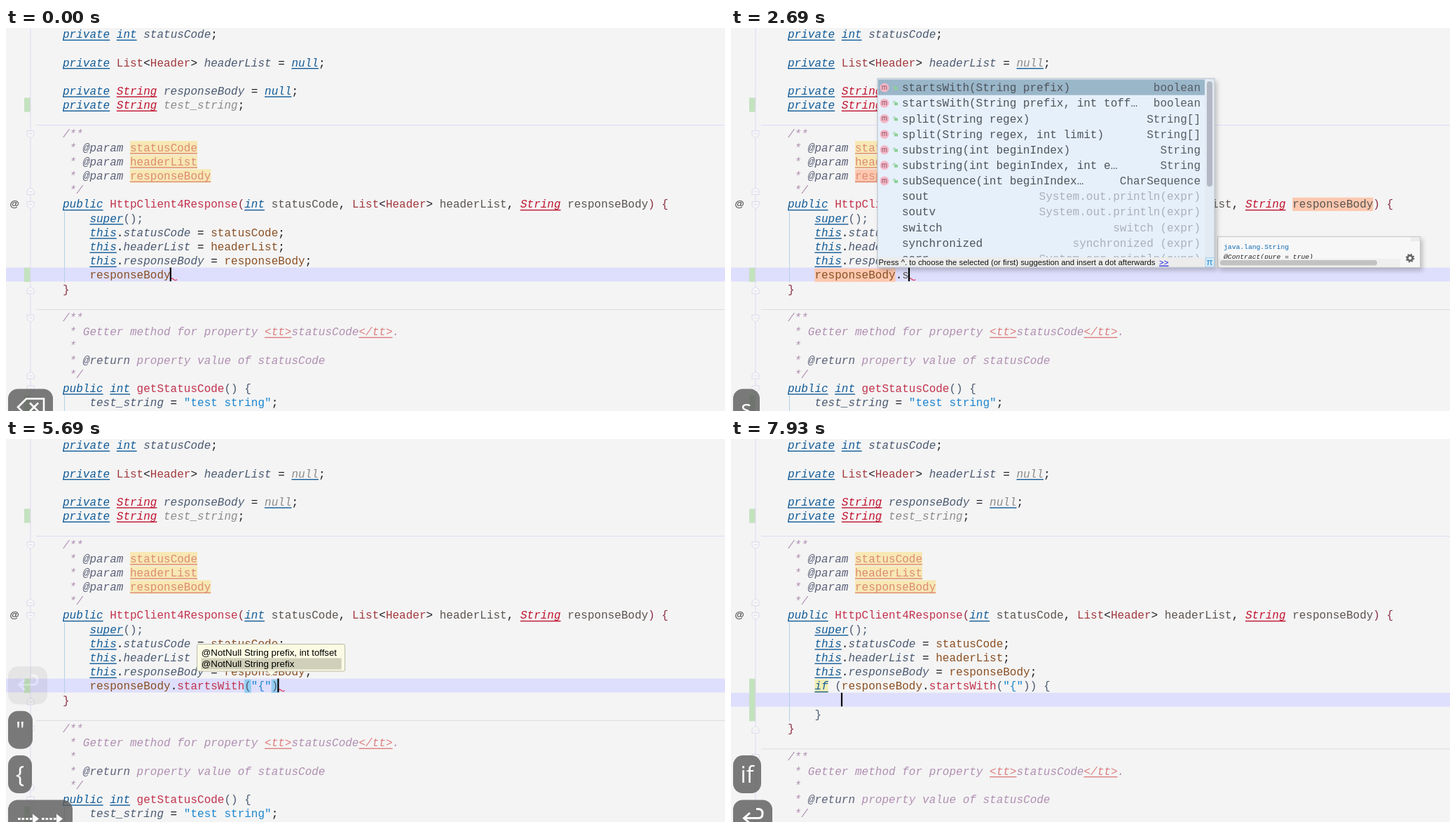
These frames come from a looping animation (1026 by 546 pixels, 8000 ms). An HTML page:

```html
<!DOCTYPE html>
<html lang="en">
<head>
<meta charset="utf-8">
<title>Postfix completion</title>
<style>
html, body { margin: 0; width: 100%; height: 100%; overflow: hidden; background: #f4f4f4; }
svg { display: block; width: 100vw; height: 100vh; }
text { white-space: pre; }
.code { font: 16px "Liberation Mono", monospace; }
.slant { font-style: italic; }
.ui { font-family: "Liberation Sans", sans-serif; }
.key { font: 32px "Open Sans", sans-serif; fill: #fff; }
</style>
</head>
<body>
<svg id="stage" viewBox="0 0 1026 546"></svg>
<script>
const stage = document.getElementById('stage');
const LOOP = 8000, CHAR = 9.602, LEFT = 81, PITCH = 20.19;
const rowTop = r => -1.1 + PITCH * r;
const colX = c => LEFT + CHAR * c;
const esc = s => s.replace(/&/g, '&amp;').replace(/</g, '&lt;');
const rect = (x, y, w, h, fill, more = '') =>
  `<rect x="${x}" y="${y}" width="${w}" height="${h}" fill="${fill}" ${more}/>`;
const path = (d, stroke, width = 1, fill = 'none', more = '') =>
  `<path d="${d}" fill="${fill}" stroke="${stroke}" stroke-width="${width}" ${more}/>`;
const text = (x, y, s, fill, more = 'class="code"') =>
  `<text x="${x}" y="${y}" fill="${fill}" ${more}>${esc(s)}</text>`;

// c: colour, i: italic, u: underline colour, bg: background,
// hot: marked as an occurrence, pair: marked as a matching bracket
const BLUE = '#125c98', RED = '#c0142f', YELLOW = '#f7e8b4', ORANGE = '#fdc8af';
const styles = {
  k: { c: BLUE, i: 1, u: BLUE },
  n: { c: BLUE, i: 1, u: BLUE },
  S: { c: RED, i: 1, u: RED },
  l: { c: '#a23a3e' },
  f: { c: '#4b5a72', i: 1 },
  u: { c: '#8c8c8c', i: 1 },
  c: { c: '#b08fb2', i: 1 },
  a: { c: '#5c6078', i: 1 },
  j: { c: '#dd8b74', u: '#dd8b74', bg: YELLOW },
  J: { c: '#dd8b74', u: '#dd8b74', bg: YELLOW, hot: 1 },
  t: { c: '#dd7f80', i: 1, u: '#dd7f80' },
  m: { c: '#c2334d' },
  b: { c: '#8a5024' },
  B: { c: '#8a5024', hot: 1 },
  p: { c: '#5a5450' },
  P: { c: '#5a5450', hot: 1 },
  x: { c: '#4b5a72' },
  X: { c: '#4b5a72', pair: 1 },
  r: { c: '#8c2f45' },
  s: { c: '#1c86d0' },
  I: { c: BLUE, i: 1, u: BLUE, bg: '#f0eeb4' }
};

const head = [
  '«k private» «k int» «f statusCode»;', '',
  '«k private» «l List»<«l Header»> «f headerList» = «n null»;', '',
  '«k private» «S String» «f responseBody» = «n null»;',
  '«k private» «S String» «u test_string»;', '',
  '«c /**»',
  '«c  * »«a @param» «j statusCode»',
  '«c  * »«a @param» «j headerList»',
  '«c  * »«a @param» «J responseBody»',
  '«c  */»',
  '«k public» «m HttpClient4Response»«r (»«k int» «p statusCode», «l List»<«l Header»> «p headerList», «S String» «P responseBody»«r )» «r {»',
  '    «k super»«x ();»',
  '    «k this».«f statusCode» = «b statusCode»;',
  '    «k this».«f headerList» = «b headerList»;',
  '    «k this».«f responseBody» = «B responseBody»;'
];
const tail = [
  '«r }»', '',
  '«c /**»',
  '«c  * Getter method for property »«t <tt>»«c statusCode»«t </tt>»«c .»',
  '«c  *»',
  '«c  * »«a @return»«c  property value of statusCode»',
  '«c  */»',
  '«k public» «k int» «m getStatusCode»«x ()» «x {»',
  '    «f test_string» = «s "test string"»;'
];
const call = s => '    «B responseBody».«m startsWith»«X (»' + s;
const expanded = [
  '    «I if» «x (»«b responseBody».«m startsWith»«x (»«s "{"»«x ))» «x {»', '', '    «x }»'
];
const plainLength = s => s.replace(/«\w |»/g, '').length;

const postfix = s => s.split(';').map(r => r.split('|'));
const methods = s => postfix(s).map(r => [...r, true]);
const allMethods = methods('startsWith(String prefix)|boolean;startsWith(String prefix, int toff…|boolean;' +
  'equals(Object anObject)|boolean;equalsIgnoreCase(String anotherStr…|boolean;hashCode()|int;' +
  'charAt(int index)|char;codePointAt(int index)|int;codePointBefore(int index)|int;' +
  'codePointCount(int beginIndex, int end…|int;compareTo(String anotherString)|int;' +
  'compareToIgnoreCase(String str)|int;concat(String str)|String');
const sMethods = [...allMethods.slice(0, 2), ...methods('split(String regex)|String[];' +
  'split(String regex, int limit)|String[];substring(int beginIndex)|String;' +
  'substring(int beginIndex, int e…|String;subSequence(int beginIndex…|CharSequence'),
  ...postfix('sout|System.out.println(expr);soutv|System.out.println(expr);' +
  'switch|switch (expr);synchronized|synchronized (expr);serr|System.err.println(expr)')];
const swMethods = [...allMethods.slice(0, 2), ...methods('endsWith(String suffix)|boolean'),
  ...postfix('switch|switch (expr)')];
const templates = postfix('if|if (expr);field|myField = expr;var|T name = expr;return|return expr;' +
  'par|(expr);arg|functionCall(expr);assert|assert expr;cast|((SomeType) expr);' +
  'castvar|T name = (T)expr;else|if (!expr);lambda|() -> expr;not|!expr');
const iTemplates = [templates[0],
  ...postfix('inst|expr instanceof SomeType;instanceof|expr instanceof SomeType')];
const wide = (rows, thumb) => ({ x: 209, w: 481, textX: 244, rows, thumb });
const narrow = (rows, thumb) => ({ x: 379, w: 429, textX: 388, rows, thumb });

const cues = [
  [0, { line: '    «B responseBody»', caret: 16, hot: false, list: null, doc: false, hint: null,
        blink: false, pair: false, typed: false, done: false }],
  [300, { line: '    «B responseBody».', caret: 17, hot: true, typed: true }],
  [450, { list: wide(allMethods, 31) }],
  [1200, { blink: true }],
  [1500, { blink: false }],
  [1650, { doc: true }],
  [2250, { line: '    «B responseBody».«p s»', caret: 18 }],
  [2540, { list: wide(sMethods, 150) }],
  [2990, { line: '    «B responseBody».«p sw»', caret: 19, list: wide(swMethods, 0) }],
  [3590, { list: null, doc: false }],
  [3740, { line: call('«X )»'), caret: 28, hint: 28 }],
  [4040, { line: call('«s ""»«X )»'), caret: 29, hint: 29, hot: false }],
  [4490, { line: call('«s "{"»«X )»'), caret: 30, hint: 30 }],
  [4940, { caret: 31, hint: 31 }],
  [5090, { caret: 32, pair: true }],
  [5990, { line: call('«s "{"»«X )».'), caret: 33, pair: false, hint: null }],
  [6140, { list: narrow(templates, 176) }],
  [6740, { line: call('«s "{"»«X )».«p i»'), caret: 34, list: narrow(iTemplates, 0) }],
  [6890, { line: call('«s "{"»«X )».«p if»'), caret: 35, list: narrow(templates.slice(0, 1), 0) }],
  [7490, { done: true, list: null, caret: 8 }]
];
const stateAt = t => Object.assign({}, ...cues.filter(c => c[0] <= t).map(c => c[1]));

const keys = [
  { label: 'back', w: 64, born: 0, fade: 1865 },
  { label: '.', w: 31, born: 300, fade: 2420 },
  { label: 's', w: 38, born: 2250, fade: 4500 },
  { label: 'w', w: 47, born: 2990, fade: 4700 },
  { label: 'enter', w: 56, born: 3590, fade: 5540 },
  { label: '"', w: 35, born: 4040, fade: 5700 },
  { label: '{', w: 34, born: 4340, fade: 5900 },
  { label: 'arrows', w: 92, born: 5090, fade: 6565 },
  { label: '.', w: 31, born: 5990, fade: 7500 },
  { label: 'if', w: 40, born: 6740, fade: 9999 },
  { label: 'enter', w: 56, born: 7340, fade: 9999 }
];

function codeLine(src, row, st) {
  let col = 0, out = '';
  const top = rowTop(row), base = top + 15.3;
  for (const [, name, styled, plain] of src.matchAll(/«(\w) ([^»]*)»|([^«]+)/g)) {
    const s = styled ?? plain, look = styles[name] || { c: '#1c1c24' };
    const x = colX(col), w = CHAR * s.length;
    const bg = look.hot && st.hot ? ORANGE : look.pair && st.pair ? '#93cdf0' : look.bg;
    if (bg) out += rect(x, top + .5, w, 19.2, bg);
    const color = name === 'n' && st.typed ? '#8a8a8a' : look.c;
    out += text(x, base, s, color, `class="code${look.i ? ' slant' : ''}"`);
    if (look.u) out += rect(x, base + 2.4, w, 1.4, look.u);
    col += s.length;
  }
  return out;
}

function fold(row, opens) {
  const y = rowTop(row) + 11.5, d = opens ? 1 : -1;
  return path(`M30 ${y - 5 * d}h10v${6 * d}l-5 ${4 * d}l-5 ${-4 * d}zM32.5 ${y - d}h5`, '#dcd8ec', 1, '#f7f7f7');
}

function editor(st) {
  const shift = st.done ? 2 : 0, caretRow = st.done ? 18 : 17;
  const lines = [...head, ...(st.done ? expanded : [st.line]), ...tail];
  const green = (row, n) => rect(26, rowTop(row) - .4, 9, n * PITCH, '#c3e2be');
  let out = rect(0, 0, 1026, 546, '#f4f4f4');
  out += rect(0, rowTop(caretRow) - .6, 1026, 19.8, '#dedefd');
  out += green(5, 1) + green(17, 1 + shift) + green(26 + shift, 2);
  out += rect(34.5, 0, 1, 546, '#ddd8f2');
  out += rect(43, 138, 983, 1, '#dedaf6') + rect(43, rowTop(20 + shift) - 1.7, 983, 1, '#dedee4');
  out += rect(83, rowTop(13), 1, (5 + shift) * PITCH, '#b5d0e4') + rect(83, rowTop(26 + shift), 1, 40, '#b5d0e4');
  for (const r of [7, 12, 20 + shift, 25 + shift]) out += fold(r, true);
  for (const r of [11, 18 + shift, 24 + shift]) out += fold(r, false);
  out += text(5.5, 254.5, '@', '#444', 'class="ui" font-size="13.5" font-weight="bold"');
  lines.forEach((s, r) => out += codeLine(s, r, st));
  if (!st.done) out += path(`M${colX(plainLength(st.line))} 358q2-2 4 0t4 1.5l1.5-1`, '#e0405a', 1.2);
  if (!st.blink) out += rect(colX(st.caret) - .9, rowTop(caretRow) - .6, 2.2, 19.6, '#000');
  return out;
}

function popup({ x, w, textX, rows, thumb }) {
  const step = 22.15, right = x + w, bar = right - 14;
  const top = Math.max(72, 327 - rows.length * step - 1.5);
  let out = rect(x, top, w, 341 - top, '#e6f0fb', 'stroke="#b4bcc4" filter="url(#shadow)"');
  out += rect(x + 1, top + 1.5, bar - x - 1, step, '#9ab6c9');
  out += '<g clip-path="url(#rows)">';
  rows.forEach(([name, type, method], i) => {
    const y = top + 13 + i * step;
    if (method) {
      out += `<circle cx="219" cy="${y}" r="6.5" fill="#f4b9c8"/>`;
      out += text(219, y + 3, 'm', '#8a4a5c', 'class="ui" font-size="10" text-anchor="middle"');
      out += rect(233, y - 1, 5, 4, '#8ccf94') + path(`M231.5 ${y}v-2q1.5-2 3 0v1`, '#8ccf94');
    }
    const strong = method || i === 0;
    out += text(textX, y + 5.2, name, '#4e545c');
    out += text(bar - 6, y + 5.2, type, strong ? '#565c64' : '#a9b1ba', 'class="code" text-anchor="end"');
  });
  out += '</g>';
  out += rect(bar, top + 1, 13, 326 - top, '#e2eaf3');
  if (thumb) out += rect(bar + 3, top + 4, 8, thumb, '#b3b9c4', 'rx="4"');
  out += rect(x + 1, 327, bar - x, 13.5, '#ececec');
  out += text(x + 1.5, 337.6, 'Press ^. to choose the selected (or first) suggestion and insert a dot afterwards', '#111', 'class="ui" font-size="11.35"');
  out += text(x + 402, 337.6, '>>', '#1414e0', 'class="ui" font-size="11.5" text-decoration="underline"');
  out += rect(right - 13, 327.5, 12.5, 13, '#d6ebf8', 'stroke="#a9d0e8"');
  return out + text(right - 7, 338, 'π', '#2288c4', 'class="ui" font-size="13" text-anchor="middle"');
}

function docPopup() {
  const small = 'font-family="Liberation Mono, monospace" font-size="9.7"';
  let out = rect(694.5, 297.5, 289, 44, '#f7f7f7', 'stroke="#c6c6c6" filter="url(#shadow)"');
  out += rect(970, 298, 13, 6, '#ececec');
  out += text(703, 315, 'java.lang.String', '#0d68b4', small);
  out += text(703, 328.5, '@Contract(pure = true)', '#222', small + ' font-style="italic"');
  out += rect(695, 329, 260, 12, '#efefef') + rect(698, 331, 224, 7.5, '#c2c2c2', 'rx="3.7"');
  out += '<circle cx="969" cy="328" r="3.6" fill="none" stroke="#666" stroke-width="2.6"/>';
  return out + '<circle cx="969" cy="328" r="5.3" fill="none" stroke="#666" stroke-width="2" stroke-dasharray="2.1 2.06"/>';
}

function hint(col) {
  const bold = col < 31, tip = colX(col), w = bold ? 218 : 211, x = tip - w / 2 - .5;
  const font = `class="ui" font-size="${bold ? 13.1 : 13.4}"`;
  const strong = bold ? 'font-weight="bold"' : '';
  let out = rect(x, 292.5, w, 38.5, '#fbfbe4', 'rx="2" stroke="#b9b9a6"');
  out += path(`M${tip - 6} 331l6 7l6-7`, '#c4c4b4', 1, '#fbfbe4');
  out += rect(x + 6, 312.5, w - 11, 16, '#d0d0ba');
  out += `<text x="${x + 6}" y="308.5" ${font}><tspan ${strong}>@NotNull String prefix</tspan>` +
    '<tspan font-size="13.2">, int toffset</tspan></text>';
  return out + text(x + 6, 325, '@NotNull String prefix', '#000', `${font} ${strong}`);
}

const icons = {
  back: path('M14 26L26 14H51V38H26zM31 20l12 12M43 20l-12 12', '#fff', 2.6),
  enter: path('M16 26H36Q42 26 42 19.5T36 13H33M24 18.5L15.5 26L24 33.5', '#fff', 3),
  arrows: [14, 48].map(x => path(`M${x} 27h22`, '#fff', 3, 'none', 'stroke-dasharray="3.6 2"') +
    path(`M${x + 21} 20l9 7l-9 7z`, 'none', 0, '#fff')).join('')
};

function keyCaps(t) {
  const shown = keys.filter(k => k.born <= t);
  return shown.map((k, i) => {
    const alpha = Math.max(0, Math.min(1, (k.fade + 170 - t) / 170));
    if (!alpha) return '';
    const y = 514.5 - 63.4 * (shown.length - 1 - i);
    const label = k.label === 'if' && t < 6890 ? 'i' : k.label;
    const w = label === 'i' ? 30 : k.w;
    const face = icons[label] || text(w / 2, 39, label, '#fff', 'class="key" text-anchor="middle"');
    return `<g transform="translate(3 ${y})" opacity="${alpha}">` +
      rect(0, 0, w, 54, '#5a5a5a', 'rx="14" fill-opacity=".8"') + face + '</g>';
  }).join('');
}

const defs = '<defs><filter id="shadow" x="-10%" y="-10%" width="125%" height="130%">' +
  '<feDropShadow dx="3" dy="4" stdDeviation="3" flood-opacity=".22"/></filter>' +
  '<clipPath id="rows"><rect y="72" width="1026" height="255"/></clipPath></defs>';

function draw(t) {
  const st = stateAt(t);
  stage.innerHTML = defs + editor(st) + (st.hint ? hint(st.hint) : '') +
    (st.doc ? docPopup() : '') + (st.list ? popup(st.list) : '') + keyCaps(t);
}

const tickAt = t => {
  const offset = t < 2540 ? 0 : 140;
  return Math.floor((t - offset) / 150) * 150 + offset;
};

const start = performance.now();
let last = -1;
function frame() {
  const tick = tickAt((performance.now() - start) % LOOP);
  if (tick !== last) draw(last = tick);
  requestAnimationFrame(frame);
}
frame();
</script>
</body>
</html>
```
